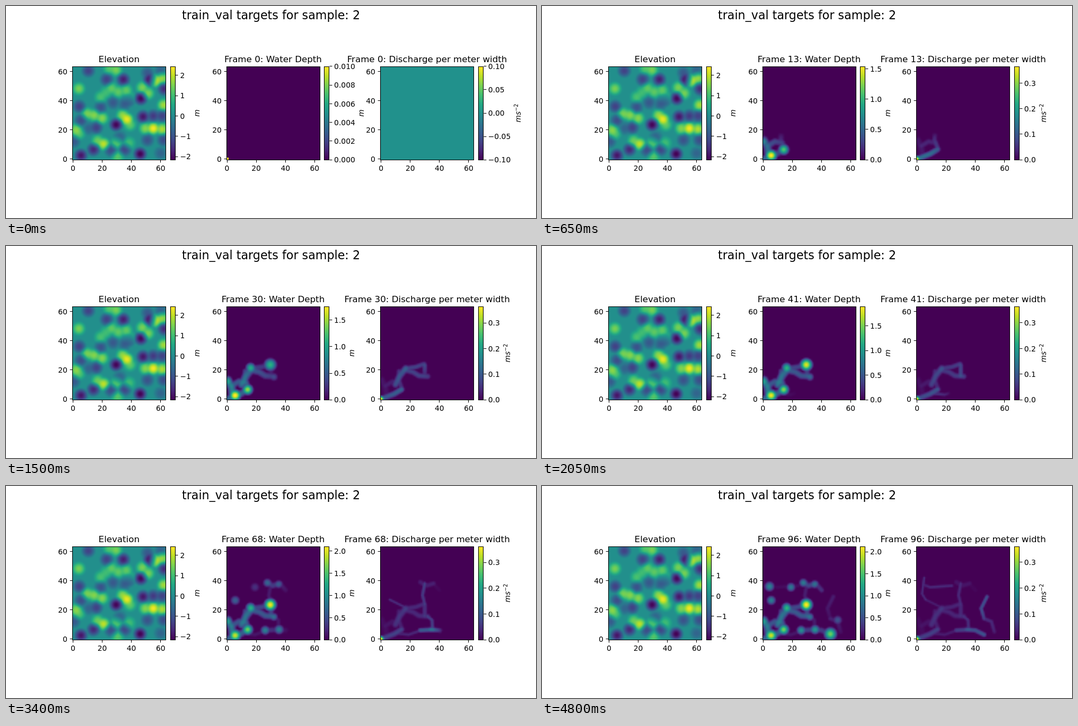
Recreate the animation shown at these times as an HTML page with a canvas. Size 1000 by 400 pixels, loop 4.85 s.

```html
<!DOCTYPE html>
<html lang="en">
<head>
<meta charset="utf-8">
<title>Water depth and discharge</title>
<style>
  html, body { margin: 0; width: 100%; height: 100%; overflow: hidden; background: #fff; }
  canvas, svg { position: absolute; }
  canvas { top: 114px; }
  svg { left: 0; top: 0; }
  text { font-family: "DejaVu Sans", sans-serif; font-size: 13.89px; fill: #000; }
  .title { font-size: 16.67px; text-anchor: middle; }
  .head { font-size: 22.22px; text-anchor: middle; }
  .power { font-size: 9.72px; }
  .line { stroke: #000; stroke-width: 1.1; fill: none; }
</style>
</head>
<body>
<svg id="stage" width="1000" height="400" viewBox="0 0 1000 400"></svg>
<script>
const STEP = 50, COUNT = 97;
const GRID = 64, SIDE = 177, CELL = 2.756;
const TOP = 113.8, BOTTOM = 290.2, PITCH = 290.625;
const LEFT = [125, 416, 706];
const VIRIDIS = ['#440154', '#482475', '#414487', '#355f8d', '#2a788e', '#21918c',
  '#22a884', '#44bf70', '#7ad151', '#bddf26', '#fde725'];

// Hills and dry hollows: x, y, size in grid units.
const hills = [
  [56.6, 53.6, 1.9], [61, 55.3, 1.6], [25, 62, 1.1], [29.5, 61, 1.4], [4, 48.2, 1.4],
  [47.5, 49, 1.4], [51.5, 45, 1.4], [19, 42.5, 1], [22.5, 45.5, 0.9], [26.5, 48.3, 1.2],
  [31, 46, 1.2], [36.5, 47, 1.2], [38.5, 42.5, 0.7], [62, 37, 1.7], [10, 31, 1.4],
  [14.5, 30, 1.5], [20, 28, 1.5], [34, 30, 1.6], [37, 27.2, 2.2], [39, 23.5, 1.2],
  [49.5, 21, 1.5], [55, 21, 2.3], [61, 20.5, 1.8], [2, 20, 1.5], [4, 17.5, 1.1],
  [17, 12.5, 1.3], [21, 10.3, 1.9], [30, 11, 1.1], [38.5, 11, 0.9], [30.5, 1.5, 1.1]
];
const hollows = [
  [10.5, 60.5, 1.4], [34.5, 54.5, 1.9], [23, 54.5, 1.4], [52.5, 54.5, 2.1],
  [51, 59, 1], [62.5, 48, 1.7], [46.5, 41.5, 2.2], [38, 40, 1.1], [48, 29, 2],
  [55, 29.5, 1.5], [61, 29.5, 1.4], [62, 13, 1.2], [60, 4, 0.8], [60, 61, 0.8], [11, 21, 0.8]
];

// Pools, which also hollow out the terrain: x, y, depth, first wet, rise time.
const pools = [
  [5.5, 2.5, 2.02, 0, 4], [14, 6.5, 1.75, 4, 5], [0.5, 12, 1, 5, 5], [16, 21.5, 1.4, 15, 5],
  [29.5, 23.5, 2.25, 26.5, 3.5], [32, 15, 0.8, 24, 8], [26, 6, 1.2, 42, 8],
  [35.5, 6.5, 1.3, 47, 10], [46, 3.5, 2.3, 68, 11], [27.5, 38.5, 1, 52, 8],
  [35.2, 37.5, 0.9, 53, 8], [19, 35.5, 1.1, 65, 8], [5.5, 26.5, 1.2, 51, 14],
  [4.3, 36, 1.4, 75, 10], [51, 13, 1.1, 87, 9]
];

// Streams: first wet, depth, flow, path.
const mainStreams = [
  [1, 0.7, 0.28, [0, 0, 9, 3.5, 14, 6.5]],
  [2, 0.9, 0.05, [4, 2, 3, 8, 0.5, 13]],
  [3, 0.6, 0.08, [3, 9, 8, 12, 13, 11]],
  [6, 0.5, 0.13, [14.5, 7, 12, 13, 12.5, 19]],
  [13, 0.85, 0.2, [10, 10, 13, 16, 17, 21]],
  [16, 0.65, 0.15, [16, 20, 22, 18.5, 26, 16, 32, 15.5]],
  [18, 0.5, 0.15, [17, 21, 24, 22, 29.5, 24]],
  [25, 0.5, 0.17, [30, 23, 30, 16]]
];
const sideStreams = [
  [33, 0.15, 0.11, [10, 4, 19, 3, 26, 5.5]],
  [41, 0.18, 0.18, [32, 15.5, 35, 13, 35.3, 7]],
  [42, 0.2, 0.16, [30, 24, 28.5, 30, 30, 38]],
  [50, 0.5, 0.07, [27, 39, 31, 36.5, 36, 38]],
  [52, 0, 0.1, [16, 22, 6, 27]],
  [57, 0.45, 0.22, [27, 6, 36, 6.5]],
  [62, 0.35, 0.02, [36, 38, 40, 33.5]],
  [63, 0.45, 0.26, [34, 6.5, 40, 6, 46, 3]],
  [72, 0, 0.11, [6, 27, 3.5, 31, 5, 42]],
  [82, 0.12, 0.09, [24, 36.5, 9, 35.5, 5, 37]],
  [84, 0.25, 0.19, [48, 29, 44, 21, 46, 14]],
  [86, 0.3, 0.09, [46, 14, 51, 12, 53, 5]]
];
const streams = [...mainStreams, ...sideStreams];

// Upper ends of the colour scales over time.
const depthMax = [[0, 0.01], [1, 0.35], [4, 0.98], [13, 1.54], [30, 1.76],
  [53, 2.05], [68, 2.11], [96, 2.125]];
const flowMax = [[1, 0.2], [4, 0.31], [12, 0.366], [30, 0.365], [68, 0.3625], [96, 0.3615]];

const clamp = (v, lo, hi) => Math.min(hi, Math.max(lo, v));

function interp(keys, n) {
  const i = clamp(keys.findIndex(k => k[0] >= n), 1, keys.length - 1);
  const [a, va] = keys[i - 1], [b, vb] = keys[i];
  return va + (vb - va) * clamp((n - a) / (b - a), 0, 1);
}

// Squared distance to a path, and how far along it the nearest point lies.
function nearest(p, x, y) {
  let best = Infinity, along = 0, walked = 0;
  for (let i = 0; i < Math.max(1, p.length - 2); i += 2) {
    const ax = p[i], ay = p[i + 1];
    const dx = (p[i + 2] ?? ax) - ax, dy = (p[i + 3] ?? ay) - ay;
    const length = Math.hypot(dx, dy);
    const t = clamp(((x - ax) * dx + (y - ay) * dy) / (length * length || 1), 0, 1);
    const d = (x - ax - t * dx) ** 2 + (y - ay - t * dy) ** 2;
    if (d < best) { best = d; along = walked + t * length; }
    walked += length;
  }
  return [best, along];
}

const blank = () => new Float32Array(GRID * GRID);

// Adds a soft stroke; cubes are summed so that overlaps blend smoothly.
function stroke(f, path, width, size) {
  for (let y = 0; y < GRID; y++) {
    for (let x = 0; x < GRID; x++) {
      const [d, along] = nearest(path, x, y);
      const q = d / (width * width);
      if (q < 1) f[y * GRID + x] += ((1 - q) ** 1.5 * size(along)) ** 3;
    }
  }
}

function bumps(list) {
  const f = blank();
  for (const [x, y, size] of list) stroke(f, [x, y], 5.6, () => size);
  return f.map(Math.cbrt);
}

function terrain() {
  const down = bumps([...hollows, ...pools]);
  return bumps(hills).map((v, i) => 0.1 + v - down[i]);
}

const rise = (age, time) => age > 0 ? age / (age + time) : 0;
const reach = depth => 1.4 + 2.4 * depth;
const TRAVEL = 0.6;

function waterDepth(n) {
  const f = blank();
  for (const [x, y, depth, start, time] of pools)
    if (n > start) stroke(f, [x, y], 2 + 1.45 * depth, () => depth * rise(n - start, time));
  for (const [start, depth, , path] of streams)
    if (n > start && depth)
      stroke(f, path, reach(depth), s => depth * rise(n - start - s * TRAVEL, 5));
  if (!n) f[0] = 1;
  return f.map(Math.cbrt);
}

function discharge(n) {
  const f = blank();
  if (n) stroke(f, [0, 0], 2.8, () => 0.37 * rise(n, 0.2));
  for (const [start, depth, flow, path] of streams) {
    if (n <= start) continue;
    stroke(f, path, reach(depth) * 0.85, s => {
      const age = n - start - s * TRAVEL;
      return flow * rise(age, 4) * (0.25 + 0.75 * Math.exp(-age / 18));
    });
  }
  return f.map(Math.cbrt);
}

const rgb = VIRIDIS.map(h => [1, 3, 5].map(i => parseInt(h.slice(i, i + 2), 16)));
const palette = Array.from({ length: 256 }, (_, i) => {
  const s = i / 25.5, k = Math.min(9, Math.floor(s));
  return rgb[k].map((c, j) => c + (rgb[k + 1][j] - c) * (s - k));
});

function paint(ctx, f, lo, hi) {
  const img = ctx.createImageData(SIDE, SIDE);
  for (let py = 0; py < SIDE; py++) {
    const gy = clamp(GRID - (py + 0.7) / CELL - 0.5, 0, GRID - 1);
    const y = Math.min(GRID - 2, Math.floor(gy)), v = gy - y;
    for (let px = 0; px < SIDE; px++) {
      const gx = clamp((px + 0.5) / CELL - 0.5, 0, GRID - 1);
      const x = Math.min(GRID - 2, Math.floor(gx)), u = gx - x, i = y * GRID + x;
      const value = (f[i] * (1 - u) + f[i + 1] * u) * (1 - v)
        + (f[i + GRID] * (1 - u) + f[i + GRID + 1] * u) * v;
      const c = palette[Math.round(clamp((value - lo) / (hi - lo), 0, 1) * 255)];
      const at = (py * SIDE + px) * 4;
      for (let j = 0; j < 3; j++) img.data[at + j] = c[j];
      img.data[at + 3] = 255;
    }
  }
  ctx.putImageData(img, 0, 0);
}

const text = (x, y, s, attrs = '') => `<text x="${x}" y="${y}" ${attrs}>${s}</text>`;
const line = d => `<path class="line" d="${d}"/>`;
const snap = v => Math.floor(v) + 0.5;

function axes(k) {
  const x0 = 125 + PITCH * k, l = LEFT[k] + 0.5, bar = snap(310 + PITCH * k);
  let out = `<rect x="${bar}" y="114.5" width="9" height="176" fill="url(#scale)"/>`
    + line(`M${l} 114.5h176v176h-176zM${bar} 114.5h9v176h-9z`);
  for (let v = 0; v <= 60; v += 20) {
    const x = x0 + (v + 0.5) * CELL, y = BOTTOM - (v + 0.5) * CELL;
    out += line(`M${snap(x)} 290.5v4.9M${l} ${snap(y)}h-4.9`)
      + text(x, 311, v, 'text-anchor="middle"')
      + text(l - 9.7, Math.round(y + 5.2), v, 'text-anchor="end"');
  }
  return out;
}

function scaleTicks(k, lo, hi, unit, power) {
  const raw = (hi - lo) / 6, mag = 10 ** Math.floor(Math.log10(raw));
  const mult = [1, 2, 2.5, 5, 10].find(m => m * mag >= raw * 0.9999);
  const step = mult * mag;
  const digits = Math.max(0, -Math.floor(Math.log10(step) + 1e-9)) + (mult === 2.5 ? 1 : 0);
  const edge = 318.75 + PITCH * k;
  let out = '', widest = 0;
  for (let i = Math.ceil(lo / step - 1e-6); i * step <= hi * 1.000001; i++) {
    const y = BOTTOM - (i * step - lo) / (hi - lo) * (BOTTOM - TOP);
    const label = (i < 0 ? '\u2212' : '') + Math.abs(i * step).toFixed(digits);
    const em = [...label].reduce((w, c) => w + ({ '.': 0.318, '\u2212': 0.838 }[c] || 0.636), 0);
    widest = Math.max(widest, em * 13.89);
    out += line(`M${snap(edge) + 1} ${snap(y)}h4.9`)
      + text((edge + 9.7).toFixed(1), Math.round(y + 5.2), label);
  }
  const x = edge + 9.7 + widest + (power ? 19 : 16);
  const raised = power ? `<tspan dy="-5.3" class="power">${power}</tspan>` : '';
  return out + text(0, 0, `<tspan font-style="italic">${unit}</tspan>${raised}`,
    `text-anchor="middle" transform="translate(${x.toFixed(1)} 202) rotate(-90)"`);
}

const title = (k, s) => text(213.3 + PITCH * k, 106, s, 'class="title"');

const stage = document.getElementById('stage');
const panels = LEFT.map(x => {
  const c = document.createElement('canvas');
  c.width = c.height = SIDE;
  c.style.left = x + 'px';
  document.body.insertBefore(c, stage);
  return c.getContext('2d');
});

const stops = VIRIDIS.map((c, i) => `<stop offset="${i / 10}" stop-color="${c}"/>`).join('');
stage.innerHTML = `<defs><linearGradient id="scale" x1="0" y1="1" x2="0" y2="0">${stops}</linearGradient></defs>`
  + text(500, 25, 'train_val targets for sample: 2', 'class="head"')
  + [0, 1, 2].map(axes).join('')
  + title(0, 'Elevation') + scaleTicks(0, -2.16, 2.44, 'm')
  + '<g id="live"></g>';
const live = document.getElementById('live');
paint(panels[0], terrain(), -2.16, 2.44);

function show(n) {
  const top = interp(depthMax, n);
  const [lo, hi] = n ? [0, interp(flowMax, n)] : [-0.1, 0.1];
  paint(panels[1], waterDepth(n), 0, top);
  paint(panels[2], discharge(n), lo, hi);
  live.innerHTML = title(1, `Frame ${n}: Water Depth`)
    + title(2, `Frame ${n}: Discharge per meter width`)
    + scaleTicks(1, 0, top, 'm') + scaleTicks(2, lo, hi, 'ms', '\u22122');
}

const begin = performance.now();
let shown = -1;
function tick() {
  const n = Math.floor(Math.max(0, performance.now() - begin) / STEP) % COUNT;
  if (n !== shown) show(shown = n);
  requestAnimationFrame(tick);
}
tick();
</script>
</body>
</html>
```
